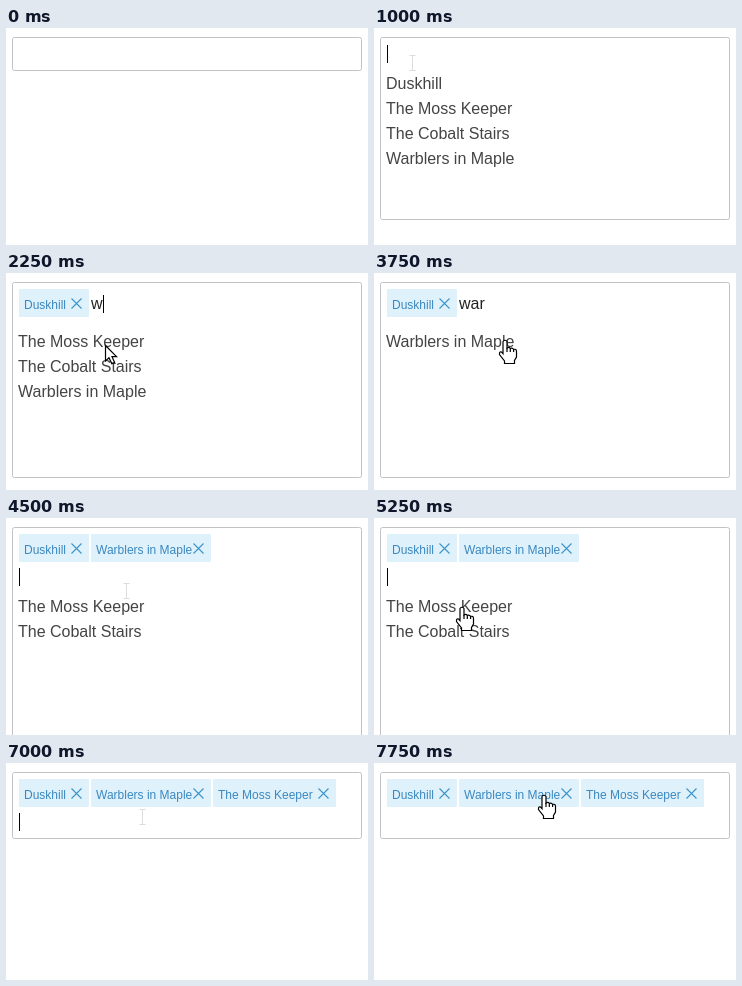
Recreate the animation shown at these times as an HTML page with a canvas. Size 362 px wide and 217 px high, loop 8000 ms.

```html
<!DOCTYPE html>
<html lang="en">
<head>
<meta charset="utf-8">
<title>Tag picker</title>
<style>
  html, body { margin: 0; width: 100%; height: 100%; overflow: hidden; background: #fff; }
  canvas { display: block; }
</style>
</head>
<body>
<canvas id="stage" width="362" height="217"></canvas>
<script>
const ctx = document.getElementById('stage').getContext('2d');
const LOOP = 8000, STEP = 250;
const FONT = '"Liberation Sans", Arial, sans-serif';

const [DUSK, MOSS, STAIRS, WARBLERS] =
  ['Duskhill', 'The Moss Keeper', 'The Cobalt Stairs', 'Warblers in Maple'];

const CHIPS = [
  { label: DUSK, x: 13, w: 70 },
  { label: WARBLERS, x: 85, w: 120 },
  { label: MOSS, x: 207, w: 123 }
];

// Each entry changes only the fields it names.
const EVENTS = [
  { t: 0, chips: 0, typed: '', list: null, caret: false, pointer: null },
  { t: 750, list: [DUSK, MOSS, STAIRS, WARBLERS], caret: true, pointer: 'beam' },
  { t: 1250, pointer: 'hand' },
  { t: 1500, caret: false },
  { t: 2000, chips: 1, list: null, caret: true, pointer: 'arrow' },
  { t: 2250, typed: 'w', list: [MOSS, STAIRS, WARBLERS] },
  { t: 2500, typed: 'wa', list: [WARBLERS] },
  { t: 2750, typed: 'war' },
  { t: 3500, caret: false, pointer: 'hand' },
  { t: 4000, chips: 2, typed: '', list: null, caret: true },
  { t: 4500, list: [MOSS, STAIRS], pointer: 'beam' },
  { t: 5000, pointer: 'hand' },
  { t: 5500, caret: false },
  { t: 5750, chips: 3, list: null },
  { t: 6000, caret: true },
  { t: 6500, caret: false, pointer: 'arrow' },
  { t: 6750, pointer: 'beam' },
  { t: 7000, caret: true },
  { t: 7250, pointer: 'hand' },
  { t: 7750, caret: false }
];

const MOUSE = [
  [0, 38, 35], [1000, 38, 35], [1500, 45, 50], [1750, 48, 54], [2000, 70, 62],
  [2250, 99, 72], [3250, 99, 72], [3750, 131, 67], [4250, 131, 67],
  [5250, 88, 89], [5500, 88, 89], [5750, 84, 88], [6250, 84, 88],
  [7500, 170, 32], [8000, 170, 32]
];

const ARROW = new Path2D('M.5 .5V16L4 12.8L6.8 18.6L9.6 17.4L7 11.7H11.5Z');
const HAND = new Path2D('M-2 1.5Q0 -1 2 1.5V8Q4 6.6 5.3 8.4Q7.4 7.3 8.6 9.4' +
  'Q11.5 8.6 11.5 11.5V17L9.5 20.5V23.5H-.5V21L-5.5 14.5Q-5.8 11.2 -3.4 12L-2 13.7Z');
const KNUCKLES = new Path2D('M2 8V12M5.3 8.8V12M8.6 9.6V12');

function stateAt(time) {
  return Object.assign({}, ...EVENTS.filter(e => e.t <= time));
}

function mouseAt(time) {
  const next = MOUSE.findIndex(k => k[0] > time);
  const [t0, x0, y0] = MOUSE[next - 1], [t1, x1, y1] = MOUSE[next];
  const p = (time - t0) / (t1 - t0);
  return [Math.round(x0 + (x1 - x0) * p), Math.round(y0 + (y1 - y0) * p)];
}

function text(str, x, y, size, color) {
  ctx.font = `${size}px ${FONT}`;
  ctx.fillStyle = color;
  ctx.fillText(str, x, y);
}

function drawChip({ label, x, w }) {
  ctx.fillStyle = '#dff1fb';
  ctx.beginPath();
  ctx.roundRect(x, 16, w, 28, 1);
  ctx.fill();
  text(label, x + 5, 36, 12, '#3b88c0');
  const cx = x + w - 12.5;
  ctx.strokeStyle = '#3b94cc';
  ctx.lineWidth = 1.1;
  ctx.beginPath();
  ctx.moveTo(cx - 5, 25.5); ctx.lineTo(cx + 5, 35.5);
  ctx.moveTo(cx + 5, 25.5); ctx.lineTo(cx - 5, 35.5);
  ctx.stroke();
}

function drawPointer(kind, [x, y]) {
  ctx.save();
  ctx.translate(x, y);
  ctx.lineWidth = 1.2;
  if (kind === 'beam') {
    ctx.strokeStyle = '#ddd';
    ctx.lineWidth = 1;
    ctx.stroke(new Path2D('M-2.5 -7.5H3.5M.5 -7.5V7.5M-2.5 7.5H3.5'));
  } else {
    const shape = kind === 'hand' ? HAND : ARROW;
    ctx.fillStyle = '#fff';
    ctx.strokeStyle = '#000';
    ctx.fill(shape);
    ctx.stroke(shape);
    if (kind === 'hand') ctx.stroke(KNUCKLES);
  }
  ctx.restore();
}

function draw(time) {
  const s = stateAt(time);
  const grow = [0, 13, 33, 33][s.chips];
  ctx.fillStyle = '#fff';
  ctx.fillRect(0, 0, 362, 217);

  ctx.strokeStyle = '#c2c2c2';
  ctx.lineWidth = 1;
  ctx.beginPath();
  ctx.roundRect(6.5, 9.5, 349, (s.list ? 182 : 33) + grow, 2);
  ctx.stroke();

  CHIPS.slice(0, s.chips).forEach(drawChip);
  (s.list || []).forEach((item, i) => text(item, 12, 61 + grow + i * 25, 16, '#444'));

  const inputX = s.chips === 1 ? 85 : 13;
  text(s.typed, inputX, 36, 16, '#222');
  if (s.caret) {
    const width = ctx.measureText(s.typed).width;
    ctx.fillStyle = '#000';
    ctx.fillRect(Math.round(inputX + width), [17, 22, 50, 50][s.chips], 1, 18);
  }
  if (s.pointer) drawPointer(s.pointer, mouseAt(time));
}

const start = performance.now();
function tick() {
  const time = (performance.now() - start) % LOOP;
  draw(Math.floor(time / STEP) * STEP);
  requestAnimationFrame(tick);
}
tick();
</script>
</body>
</html>
```
